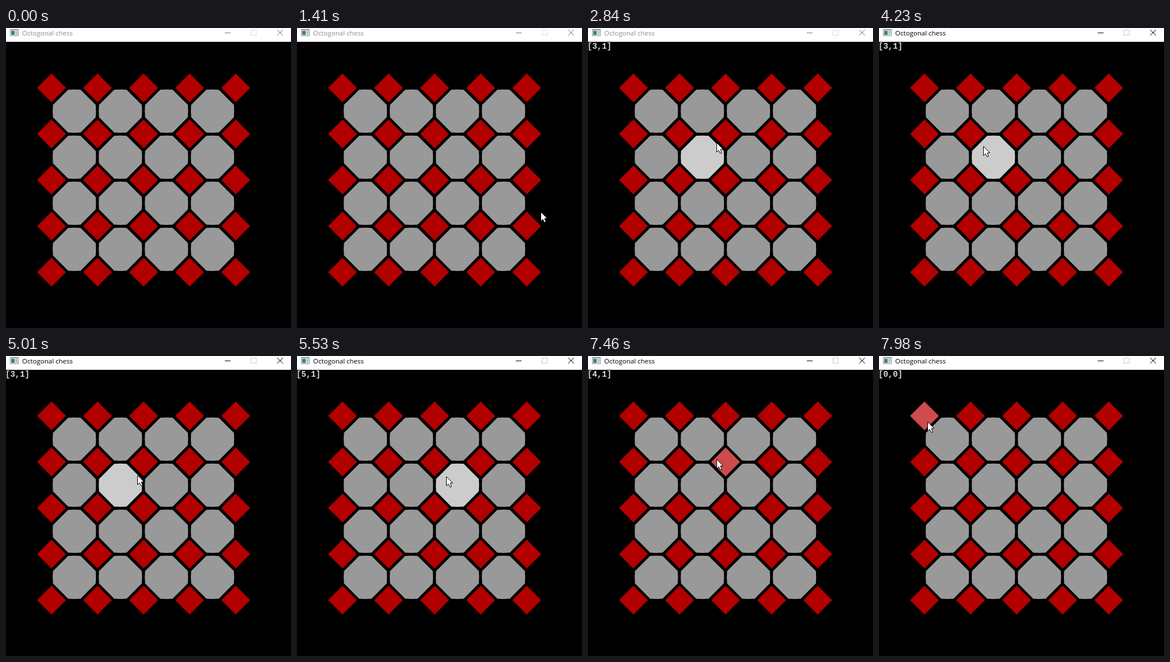
These frames come from a looping animation (495 px wide and 521 px high, 8 s). An HTML page with a canvas:

```html
<!DOCTYPE html>
<html lang="en">
<head>
<meta charset="utf-8">
<title>Octogonal chess</title>
<style>
html, body { margin: 0; width: 100%; height: 100%; overflow: hidden; background: #000; }
canvas { display: block; }
</style>
</head>
<body>
<canvas id="stage" width="495" height="521"></canvas>
<script>
const ctx = document.getElementById('stage').getContext('2d');
const LOOP = 8000, ENTER = 890, FOCUS = 3810;
const PITCH = 80, LEFT = 79, TOP = 104;

// The pointer glides in straight strokes between these stops.
const stops = [
  { t: ENTER, x: 490, y: 382 },
  { t: 2190, x: 322, y: 225 },
  { t: 2840, x: 223, y: 199 },
  { t: 3390, x: 181, y: 205 },
  { t: 4230, x: 181, y: 205 },
  { t: 5530, x: 259, y: 209 },
  { t: 5950, x: 281, y: 220 },
  { t: 6780, x: 281, y: 220 },
  { t: 6910, x: 271, y: 219 },
  { t: 7560, x: 214, y: 172 },
  { t: 7980, x: 84, y: 114 }
];

const between = (t, from, to) => t >= from && t < to;
const isPressed = t => between(t, FOCUS, 4230) || between(t, 6320, 6510);

// The screen refreshes in pairs: 30 ms, then 100 ms.
const refresh = t => t - t % 130 + (t % 130 >= 30 ? 30 : 0);

function pointerAt(t) {
  const next = stops.findIndex(stop => stop.t > t);
  if (next < 0) return stops[stops.length - 1];
  const a = stops[next - 1], b = stops[next];
  const k = refresh(t - a.t) / (b.t - a.t);
  const mix = (p, q) => Math.round(p + (q - p) * k);
  return { x: mix(a.x, b.x), y: mix(a.y, b.y) };
}

// Even columns are diamonds, odd columns are octagons.
function tileAt({ x, y }) {
  const u = (x - LEFT) / PITCH, v = (y - TOP) / PITCH;
  const inside = (i, j, n) => i >= 0 && j >= 0 && i < n && j < n;
  const i = Math.round(u), j = Math.round(v);
  const near = Math.abs(u - i) + Math.abs(v - j) < 28.5 / PITCH;
  if (near && inside(i, j, 5)) return [2 * i, j];
  const col = Math.floor(u), row = Math.floor(v);
  return inside(col, row, 4) ? [2 * col + 1, row] : null;
}

// Repeats one side of a shape in four quarter turns.
function quarterTurns(side) {
  const points = [];
  for (let turn = 0; turn < 4; turn++) {
    points.push(...side);
    side = side.map(([x, y]) => [-y, x]);
  }
  return points;
}

const diamond = quarterTurns([[0, -25]]);
const octagon = quarterTurns([[-10.8, -37.1], [0, -37.6], [10.8, -37.1]]);
const arrow = [[0, 0], [0, 16], [3.5, 12.8], [6, 18], [8, 18], [8.5, 16.5], [6.5, 11.5], [11, 11]];

function polygon(points, x, y, fill, scale = 1) {
  ctx.beginPath();
  for (const [px, py] of points) ctx.lineTo(x + px * scale, y + py * scale);
  ctx.closePath();
  ctx.fillStyle = fill;
  ctx.fill();
}

function rect(color, x, y, w, h) {
  ctx.fillStyle = color;
  ctx.fillRect(x, y, w, h);
}

function text(string, x, y, font, color) {
  ctx.font = font;
  ctx.fillStyle = color;
  ctx.fillText(string, x, y);
}

function drawTile(col, row, hover, pressed) {
  const x = LEFT + col * PITCH / 2, y = TOP + row * PITCH;
  if (col % 2) {
    const cx = x - .3, cy = y + PITCH / 2 + .3;
    if (pressed) polygon(octagon, cx, cy, '#fff', 1.1);
    polygon(octagon, cx, cy, hover ? '#ccc' : '#999');
  } else {
    polygon(diamond, x, y, hover ? '#cc4c4c' : '#b20000');
  }
}

function drawTitleBar(active) {
  const ink = active ? '#000' : '#777';
  rect('#fff', 0, 0, 495, 24);

  rect('#8c9496', 7, 2, 15, 12);
  rect('#f4f6f6', 8, 4, 13, 9);
  rect('#3d7f80', 9, 5, 6, 7);
  rect('#b4c4c8', 16, 5, 4, 7);
  text('Octogonal chess', 28, 13, '11.5px "Open Sans", sans-serif', active ? '#000' : '#8c8c8c');

  rect(ink, 380, 8, 10, 1);
  ctx.lineWidth = 1;
  ctx.strokeStyle = active ? '#ccc' : '#ddd';
  ctx.strokeRect(425.5, 3.5, 9, 9);
  ctx.beginPath();
  for (const side of [-5, 5]) {
    ctx.moveTo(476 - side, 3);
    ctx.lineTo(476 + side, 13);
  }
  ctx.strokeStyle = ink;
  ctx.stroke();
}

function drawPointer({ x, y }) {
  polygon(arrow, x + .5, y + .5, '#fff');
  ctx.lineWidth = 1;
  ctx.strokeStyle = '#000';
  ctx.stroke();
}

function draw(t) {
  const pointer = t >= ENTER ? pointerAt(t) : null;
  const hover = pointer && tileAt(pointer);
  rect('#000', 0, 0, 495, 521);
  drawTitleBar(t >= FOCUS);
  for (let col = 0; col < 9; col++) {
    for (let row = 0; row < 5 - col % 2; row++) {
      const over = hover && hover[0] === col && hover[1] === row;
      drawTile(col, row, over, over && isPressed(t));
    }
  }
  if (hover) text(`[${hover}]`, -1, 36, 'bold 14px "Liberation Mono", monospace', '#ddd');
  if (pointer) drawPointer(pointer);
}

const start = performance.now();
function frame() {
  draw((performance.now() - start) % LOOP);
  requestAnimationFrame(frame);
}
frame();
</script>
</body>
</html>
```
